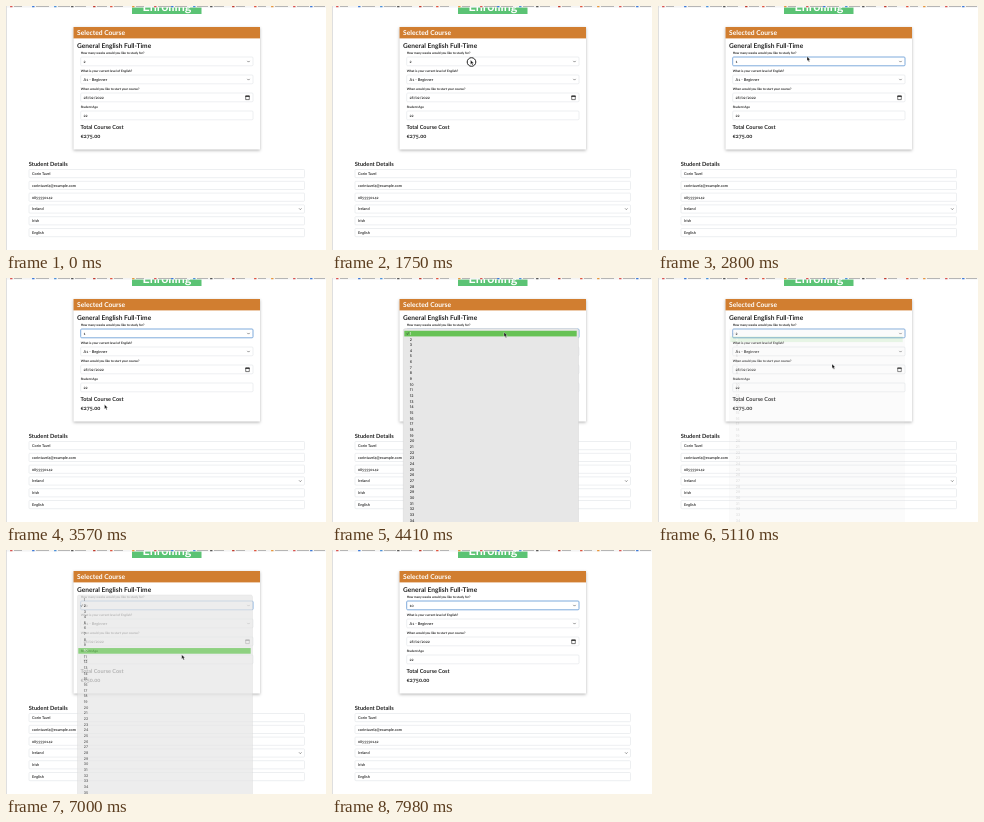
Animation of 320 by 244 pixels, one loop 8 s. Source, as an HTML page:

```html
<!DOCTYPE html>
<html lang="en">
<head>
<meta charset="utf-8">
<title>Course booking form</title>
<style>
  html, body { margin: 0; width: 100%; height: 100%; overflow: hidden; background: #fff; }
  svg { display: block; width: 100vw; height: 100vh; }
  text {
    font-family: Lato, "Open Sans", sans-serif;
    font-variant-numeric: oldstyle-nums;
    font-weight: 700;
    fill: #222;
    text-rendering: geometricPrecision;
  }
  .value { font-weight: 600; }
  .menu text { font-family: Inter, "Liberation Sans", sans-serif; font-weight: 500; font-variant-numeric: normal; }
  .card { filter: drop-shadow(0 1.5px 1.5px rgba(0, 0, 0, .3)); }
  .field { fill: #fff; stroke: #e1e4e8; stroke-width: .6; }
  .focus { fill: #fff; stroke: #7fabdc; stroke-width: 1; }
  .line { fill: none; stroke: #444; stroke-width: .6; }
</style>
</head>
<body>
<svg id="stage" viewBox="0 0 320 244"></svg>
<script>
const LOOP = 8000, STEP = 70;
const ROW = 5.66, FIELD_Y = 55.6;

const text = (x, mid, size, str, attrs = '') =>
  `<text x="${x}" y="${mid + size * .35}" font-size="${size}" ${attrs}>${str}</text>`;
const rect = (x, y, w, h, attrs) =>
  `<rect x="${x}" y="${y}" width="${w}" height="${h}" ${attrs}/>`;
const chevron = (x, y) =>
  `<path class="line" d="M${x - 1.2} ${y - .6}l1.2 1.2l1.2-1.2"/>`;

function bookmarks() {
  const colours = ['#d9534f', '#e0533d', '#555', '#3b78d8', '#e8963a', '#c0392b', '#4a90d9'];
  let out = '';
  for (let i = 0; i < 16; i++) {
    const x = 4 + i * 20 + (i * 7) % 5;
    out += rect(x, 0, 2.6, 1.3, `rx=".6" fill="${colours[i * 3 % 7]}"`)
         + rect(x + 4, 0, 8 + (i * 5) % 6, .8, 'fill="#a5a5a5"');
  }
  return out;
}

function courseCard() {
  const rows = [
    ['How many weeks would you like to study for?', 47.2, ''],
    ['What is your current level of English?', 65.2, 'A1 - Beginner'],
    ['When would you like to start your course?', 83.2, '28/02/2022'],
    ['Student Age', 101.2, '22'],
  ];
  return rect(67.5, 21, 186.5, 122.5, 'class="card" fill="#fff"')
    + rect(67.5, 21, 186.5, 11.4, 'fill="#d17e30"')
    + text(71, 26.7, 6.7, 'Selected Course', 'style="fill:#fff"')
    + text(71, 39.5, 6.6, 'General English Full-Time')
    + rows.map(([label, y, value], i) =>
        text(74.7, y, 3.15, label)
        + rect(74.7, y + 3.8, 172.3, 8.8, `class="field" rx="1" ${i ? '' : 'id="weeksBox"'}`)
        + text(77.5, y + 8.3, 3.9, value, `class="value" ${i ? '' : 'id="weeks"'}`)
        + (i < 2 ? chevron(242.5, y + 8.3) : '')).join('')
    + '<path d="M239.7 90h3.6v3.6h-3.6z" fill="none" stroke="#222" stroke-width=".6"/>'
    + rect(239.4, 89.6, 4.2, 1.2, 'fill="#222"')
    + text(74.5, 121, 5.5, 'Total Course Cost')
    + text(74.8, 130.5, 5.6, '', 'id="cost"');
}

function studentDetails() {
  const values = ['Corin Tavel', 'corintavel4@example.com', '0855550142', 'Ireland', 'Irish', 'English'];
  return text(22.8, 158, 5.7, 'Student Details')
    + values.map((value, i) => {
        const y = 167.6 + i * 11.8;
        return rect(23, y - 4.1, 275.5, 8.2, 'class="field" rx=".8"')
          + text(26, y, 3.8, value, 'class="value"');
      }).join('')
    + chevron(294.3, 203);
}

function menuRows() {
  let out = '';
  for (let n = 1; n <= 36; n++) out += text(77.8, (n - 1) * ROW, 3.6, n);
  return out;
}

document.getElementById('stage').innerHTML =
  rect(0, 0, 320, 244, 'fill="#fff"')
  + rect(126, 0, 69.5, 8, 'fill="#5bc374"')
  + text(161, 1, 12.5, 'Enrolling', 'text-anchor="middle" style="fill:#fff"')
  + rect(0, 0, 320, 1.6, 'fill="#f4f4f4"')
  + bookmarks()
  + rect(0, 0, .8, 244, 'fill="#d8d8d8"')
  + courseCard()
  + studentDetails()
  + `<g id="menu" class="menu">
      ${rect(71.3, -5, 175.2, 230, 'rx="2" fill="#e7e7e7" stroke="#cfcfcf" stroke-width=".4"')}
      ${rect(72.3, -ROW / 2, 172.4, ROW, 'id="hover" fill="#67c255"')}
      ${menuRows()}
      <path id="tick" class="line" d="M74.6 0l.8 1l1.3-2.2"/>
    </g>
    <g id="cursor">
      <circle id="ring" cx="1" cy="2" r="4.3" fill="none" stroke="#222" stroke-width="1"/>
      <path d="M0 0v4.4l1-.9l.8 1.8l.9-.4l-.8-1.7h1.4z" fill="#111" stroke="#fff" stroke-width=".35"/>
    </g>`;

const el = id => document.getElementById(id);
const [menu, hover, tick, cursor, ring, weeks, weeksBox, cost] =
  ['menu', 'hover', 'tick', 'cursor', 'ring', 'weeks', 'weeksBox', 'cost'].map(el);
const menuTexts = [...menu.querySelectorAll('text')];

// time, x, y
const path = [
  [0, 48, 250], [70, 48, 246], [490, 88, 140], [840, 119, 55], [1050, 119, 55], [1260, 121, 52],
  [1540, 124, 52], [1750, 138.5, 54], [1960, 139, 54], [2310, 149, 50.5], [3150, 149, 50.5],
  [3570, 98.5, 126.5], [3710, 98.5, 127], [4270, 172, 54], [4620, 172, 55], [4830, 173, 61],
  [4900, 173, 61], [5110, 174, 86], [5460, 100, 127], [5670, 100, 127], [6090, 186, 54],
  [6370, 186, 54], [6580, 189, 100.5], [6930, 189, 100.5], [7210, 104, 127], [7350, 104, 127],
  [7560, 150, -8],
];
const clicks = [[1680, 1890], [2380, 2520], [4270, 4410], [4830, 4900], [6020, 6300], [6860, 6930]];
const menus = [
  { open: 1890, fade: 2520, end: 2800, chosen: 2, hovers: [[0, 2], [2170, 1]] },
  { open: 4410, fade: 4880, end: 5150, chosen: 1, hovers: [[0, 1], [4760, 2]] },
  { open: 6090, fade: 6930, end: 7200, chosen: 2, hovers: [[0, 2], [6440, 5], [6510, 8], [6580, 10]] },
];
const weekSteps = [[0, '2'], [2590, '1'], [4970, '2'], [6930, '10']];
const costSteps = [[0, '€275.00'], [5320, '€550.00'], [7210, '€2750.00']];

const stepAt = (steps, t) => steps.filter(s => s[0] <= t).pop()[1];

function cursorAt(t) {
  const i = path.findIndex(p => p[0] > t);
  if (i < 0) return path[path.length - 1].slice(1);
  const [t0, x0, y0] = path[i - 1], [t1, x1, y1] = path[i];
  const k = (t - t0) / (t1 - t0), e = k * k * (3 - 2 * k);
  return [x0 + (x1 - x0) * e, y0 + (y1 - y0) * e];
}

function drawMenu(t) {
  const m = menus.find(m => t >= m.open && t < m.end);
  menu.style.display = m ? '' : 'none';
  if (!m) return;
  const row = stepAt(m.hovers, t);
  const top = FIELD_Y - (m.chosen - 1) * ROW;
  menu.setAttribute('transform', `translate(0 ${top})`);
  menu.style.opacity = t < m.fade ? 1 : (m.end - t) / (m.end - m.fade);
  hover.setAttribute('y', (row - 1.5) * ROW);
  tick.setAttribute('transform', `translate(0 ${(m.chosen - 1) * ROW})`);
  menuTexts.forEach((node, i) => { node.style.fill = i + 1 === row ? '#fff' : ''; });
}

function draw(t) {
  drawMenu(t);
  weeks.textContent = stepAt(weekSteps, t);
  cost.textContent = stepAt(costSteps, t);
  weeksBox.setAttribute('class', t >= menus[0].open ? 'focus' : 'field');
  cursor.setAttribute('transform', `translate(${cursorAt(t)})`);
  ring.style.display = clicks.some(([a, b]) => t >= a && t < b) ? '' : 'none';
}

const start = performance.now();
function tickFrame() {
  const t = Math.max(0, performance.now() - start) % LOOP;
  draw(Math.floor(t / STEP) * STEP);
  requestAnimationFrame(tickFrame);
}
tickFrame();
</script>
</body>
</html>
```
